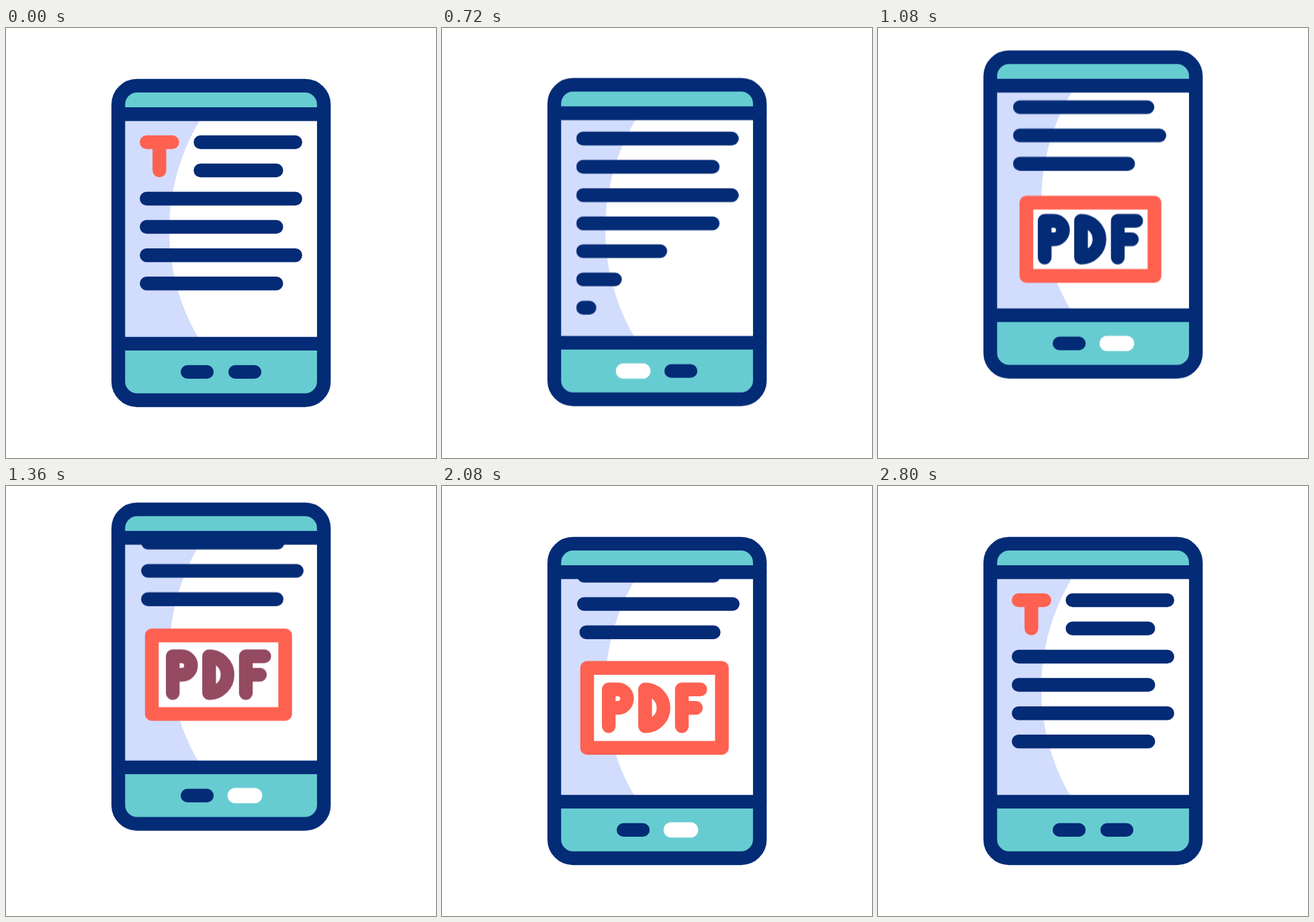
These frames come from a looping animation (640x640 px, 3 s). An HTML page:

```html
<!DOCTYPE html>
<html lang="en">
<head>
<meta charset="utf-8">
<title>Reader</title>
<style>
  :root { --navy: #032b76; --red: #ff6151; }
  html, body { margin: 0; width: 100%; height: 100%; overflow: hidden; background: #fff; }
  svg { display: block; width: 100%; height: 100%; }
  svg * { animation-duration: 3s; animation-iteration-count: infinite; animation-timing-function: linear; }

  .line { fill: none; stroke: var(--navy); stroke-width: 20.4; stroke-linecap: round; stroke-linejoin: round; }
  .red { stroke: var(--red); }
  .lit { stroke: #fff; stroke-width: 22.9; }

  #phone { animation-name: lift; }
  #page { animation-name: scroll; }
  #word { animation-name: tint; }
  #frame { fill: #fff; animation-name: widen; }
  #prev { animation-name: prev; animation-timing-function: step-end; }
  #next { animation-name: next; animation-timing-function: step-end; }
  .trim { stroke-dasharray: 1 2; stroke-dashoffset: 1.01; }
  #a { animation-name: rowA; }
  #b { animation-name: rowB; }
  #c { animation-name: rowC; }

  @keyframes lift {
    0%, 19.83% { transform: translateY(0); animation-timing-function: cubic-bezier(.6, 0, .21, 1); }
    47.83%, 50.2% { transform: translateY(-51.4px); animation-timing-function: cubic-bezier(.333, 0, .667, 1); }
    67.37%, 100% { transform: translateY(0); }
  }
  @keyframes scroll {
    0%, 9.2% { transform: translate(0, 0); animation-timing-function: cubic-bezier(.6, 0, .21, 1); }
    49.5%, 69.33% { transform: translate(2px, -288px); animation-timing-function: cubic-bezier(.333, 0, .667, 1); }
    93.33%, 100% { transform: translate(0, 0); }
  }

  /* Rows grow from the left, then shrink towards the right. */
  @keyframes rowA {
    0%, 9.5% { stroke-dashoffset: 1.01; animation-timing-function: cubic-bezier(.6, 0, .21, 1); }
    41%, 76% { stroke-dashoffset: 0; animation-timing-function: cubic-bezier(.333, 0, .667, 1); }
    93.33%, 100% { stroke-dashoffset: -1.01; }
  }
  @keyframes rowB {
    0%, 13.5% { stroke-dashoffset: 1.01; animation-timing-function: cubic-bezier(.6, 0, .21, 1); }
    45%, 72% { stroke-dashoffset: 0; animation-timing-function: cubic-bezier(.333, 0, .667, 1); }
    89.33%, 100% { stroke-dashoffset: -1.01; }
  }
  @keyframes rowC {
    0%, 17.5% { stroke-dashoffset: 1.01; animation-timing-function: cubic-bezier(.6, 0, .21, 1); }
    49%, 68% { stroke-dashoffset: 0; animation-timing-function: cubic-bezier(.333, 0, .667, 1); }
    85.33%, 100% { stroke-dashoffset: -1.01; }
  }

  @keyframes widen {
    0%, 36% { x: -95.3px; y: -54.5px; width: 190.6px; height: 109px; animation-timing-function: cubic-bezier(.333, 0, .667, 1); }
    49.33%, 100% { x: -100.3px; y: -59.5px; width: 200.6px; height: 119px; }
  }
  @keyframes tint {
    0%, 40% { stroke: var(--navy); }
    49.33%, 69.33% { stroke: var(--red); }
    78%, 100% { stroke: var(--navy); }
  }
  @keyframes prev {
    0% { opacity: 0; }
    9.33% { opacity: 1; }
    29.33% { opacity: 0; }
    49.33% { opacity: 1; }
    68%, 100% { opacity: 0; }
  }
  @keyframes next {
    0% { opacity: 0; }
    29.33% { opacity: 1; }
    49.33% { opacity: 0; }
    68% { opacity: 1; }
    93.3%, 100% { opacity: 0; }
  }
</style>
</head>
<body>
<svg viewBox="0 0 640 640">
  <defs>
    <clipPath id="screen"><rect x="172" y="128" width="296" height="342"/></clipPath>
    <clipPath id="body"><rect x="167.1" y="85.9" width="306" height="468.1" rx="28"/></clipPath>
  </defs>
  <g id="phone">
    <g clip-path="url(#screen)">
      <rect x="172" y="128" width="296" height="342" fill="#d2dcfd"/>
      <circle cx="561" cy="301.2" r="318" fill="#fff"/>
      <g id="page">
        <path class="line red" d="M209.3 170H247.5M228.3 170V212"/>
        <path class="line" d="M289.5 170H430.7M289.5 212H402.3M209.3 254H430.7M209.3 296H402.3M209.3 338.2H430.7M209.3 380.2H402.3"/>
        <path class="line trim" id="a" pathLength="1" d="M209.3 421.6H402.3"/>
        <path class="line trim" id="b" pathLength="1" d="M209.3 463.6H430.7"/>
        <path class="line trim" id="c" pathLength="1" d="M209.3 505.7H402.3"/>
        <g transform="translate(314.3 618.2)">
          <rect class="line red" id="frame" x="-100.3" y="-59.5" width="200.6" height="119"/>
          <path class="line" id="word" d="M-68.1 27.4V-27.4H-54.6A13.7 13.7 0 0 1 -54.6 0H-68.1
            M-14 -27.4A27.4 27.4 0 0 1 -14 27.4Z
            M40.7 27.4V-27.4H68.1M40.7 0H61.7"/>
        </g>
      </g>
    </g>
    <g clip-path="url(#body)" fill="#67ccd1">
      <rect x="167" y="85" width="306" height="43"/>
      <rect x="167" y="470" width="306" height="85"/>
    </g>
    <rect class="line" x="167.1" y="85.9" width="306" height="468.1" rx="28"/>
    <path class="line" d="M167.1 128.2H473.1M167.1 469.9H473.1"/>
    <path class="line" d="M270.2 511.9H298.9M341.2 511.9H369.9"/>
    <path class="line lit" id="prev" d="M270.2 511.9H298.9"/>
    <path class="line lit" id="next" d="M341.2 511.9H369.9"/>
  </g>
</svg>
</body>
</html>
```
